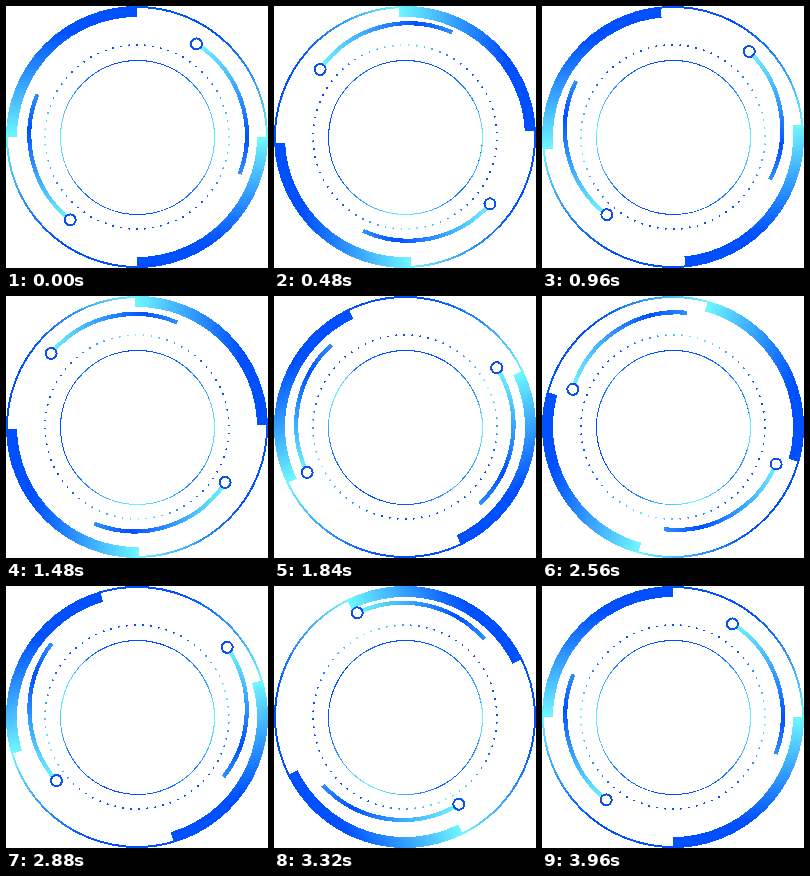
These frames come from a looping animation (262 by 262 pixels, 4000 ms). An HTML page:

```html
<!DOCTYPE html>
<html lang="en">
<head>
<meta charset="utf-8">
<title>Rotating rings</title>
<style>
  html, body { margin: 0; height: 100%; overflow: hidden; background: #fff; }
  svg { display: block; width: 100%; height: 100%; fill: none; shape-rendering: crispEdges; }
</style>
</head>
<body>
<svg viewBox="0 0 262 262">
  <defs>
    <linearGradient id="band" gradientUnits="userSpaceOnUse" x1="0" y1="0" x2="0" y2="262">
      <stop offset=".1" stop-color="#0050ff"/>
      <stop offset=".5" stop-color="#70f8ff"/>
      <stop offset=".9" stop-color="#0050ff"/>
    </linearGradient>
    <linearGradient id="core" gradientUnits="userSpaceOnUse" x1="0" y1="39" x2="0" y2="223">
      <stop offset=".1" stop-color="#0050ff"/>
      <stop offset=".5" stop-color="#70f8ff"/>
      <stop offset=".9" stop-color="#0050ff"/>
    </linearGradient>
    <linearGradient id="fall" gradientUnits="userSpaceOnUse" x1="0" y1="38" x2="0" y2="168">
      <stop stop-color="#70f4ff"/>
      <stop offset=".72" stop-color="#0050ff"/>
      <stop offset="1" stop-color="#3090ff"/>
    </linearGradient>
    <linearGradient id="rise" gradientUnits="userSpaceOnUse" x1="0" y1="214" x2="0" y2="88">
      <stop stop-color="#70f4ff"/>
      <stop offset=".72" stop-color="#0050ff"/>
      <stop offset="1" stop-color="#3090ff"/>
    </linearGradient>
  </defs>

  <g id="rings">
    <g stroke="url(#band)">
      <circle cx="131" cy="131" r="130" stroke-width="2"/>
      <path stroke-width="11" d="M5.5 131A125.5 125.5 0 0 1 131 5.5M256.5 131A125.5 125.5 0 0 1 131 256.5"/>
    </g>
    <circle cx="131" cy="131" r="92" stroke="url(#core)" stroke-width="2" stroke-linecap="round" pathLength="72" stroke-dasharray="0 1"/>
  </g>

  <!-- A turning ring whose upper right half is covered by a still one. -->
  <g stroke="url(#core)" stroke-width="1.1">
    <circle id="hoop" cx="131.5" cy="131.5" r="77"/>
    <path d="M77 77A77 77 0 0 1 186 186"/>
  </g>

  <g id="pointers">
    <g stroke-width="4.2">
      <path stroke="url(#fall)" d="M190.4 37.7A108.6 108.6 0 0 1 233.7 168.1"/>
      <path stroke="url(#rise)" d="M64.2 213.9A108.6 108.6 0 0 1 31.3 88.3"/>
    </g>
    <g stroke="#0a50f5" stroke-width="2" fill="#fff">
      <circle cx="190.4" cy="37.9" r="5.5"/>
      <circle cx="64.2" cy="213.9" r="5.5"/>
    </g>
  </g>
</svg>
<script>
  const LOOP = 4000, STEP = 40, LAST = LOOP / STEP - 1;

  function turn(id, angle, x, y) {
    document.getElementById(id).setAttribute('transform', `rotate(${angle} ${x} ${y})`);
  }

  // Everything makes two turns per loop, the rings against the rest.
  function draw() {
    const step = Math.floor(performance.now() % LOOP / STEP);
    const angle = 720 * step / LAST;
    turn('rings', angle, 131, 131);
    turn('hoop', -angle, 131.5, 131.5);
    turn('pointers', -angle, 131.7, 126.3);
    requestAnimationFrame(draw);
  }
  draw();
</script>
</body>
</html>
```
